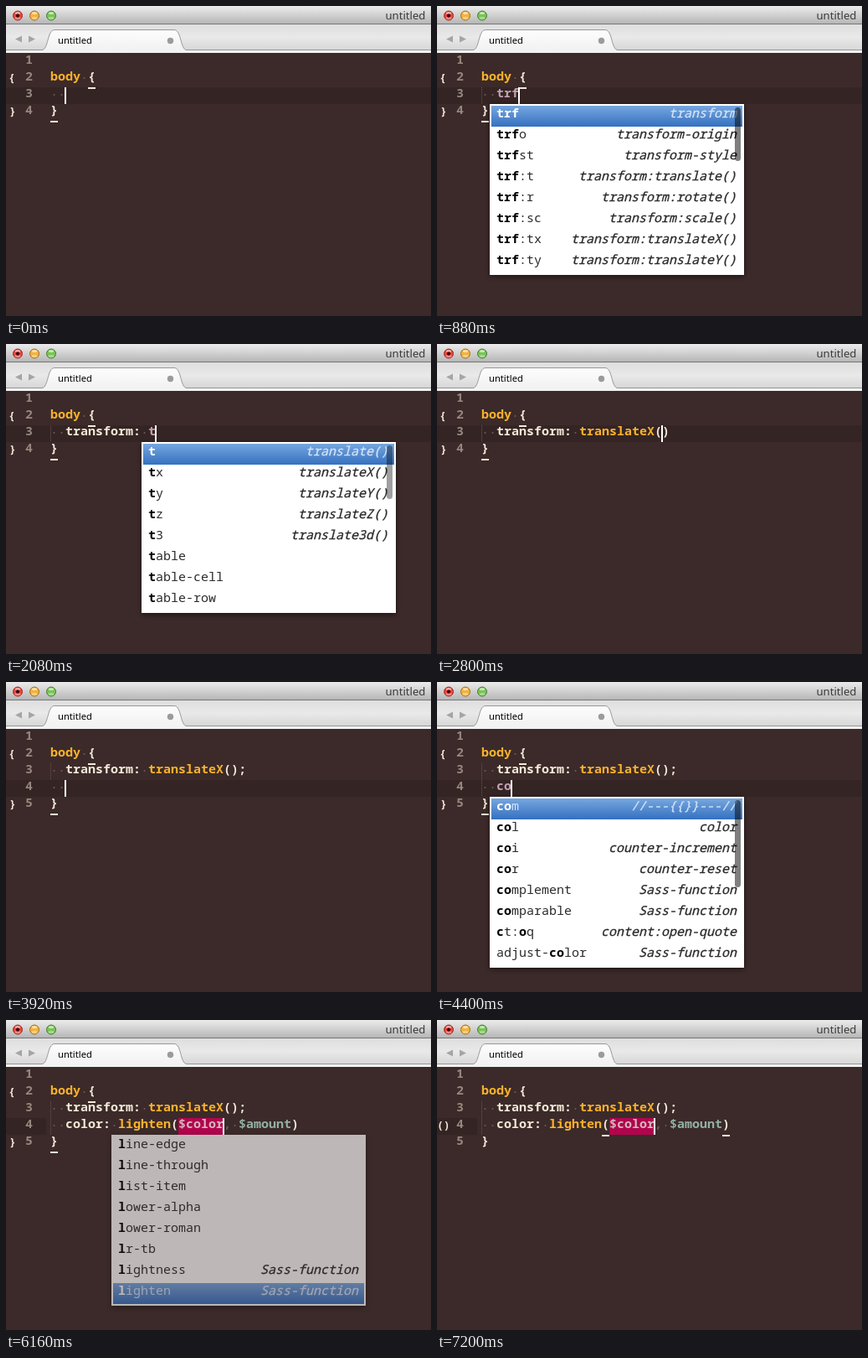
Animation of 508 by 370 pixels, one loop 8 s. Source, as an HTML page:

```html
<!DOCTYPE html>
<html lang="en">
<head>
<meta charset="utf-8">
<title>Editor autocompletion</title>
<style>
html, body { margin: 0; width: 100%; height: 100%; overflow: hidden; background: #3b2a29; }
svg { display: block; }
text { white-space: pre; font: 15px "Noto Sans Mono", monospace; }
.ui { font-family: "Noto Sans", sans-serif; }
.code { font-weight: bold; fill: #f2e8d8; }
.num { font-weight: bold; fill: #94877e; }
.mark { font-size: 13px; font-weight: bold; fill: #f2e8d8; }
.call { fill: #fbb22c; }
.bare { fill: #c3a2b2; }
.arg { fill: #92b0a6; }
.picked { fill: #d6b6bd; }
.dim { fill: #715d5b; }
.row { fill: #2b2b2b; }
.row .hit { font-weight: bold; fill: #000; }
.row .info { font-style: italic; stroke: #2b2b2b; stroke-width: .3px; }
.on, .row.on .info { fill: #d3e3f8; }
.row.on .info { stroke: #d3e3f8; }
.row.on .hit { fill: #fff; }
</style>
</head>
<body>
<svg width="508" height="370" viewBox="0 0 508 370">
  <defs>
    <linearGradient id="bar" x2="0" y2="1"><stop stop-color="#ececec"/><stop offset="1" stop-color="#b4b4b4"/></linearGradient>
    <linearGradient id="strip" x2="0" y2="1"><stop stop-color="#dedede"/><stop offset=".5" stop-color="#e9e9e9"/><stop offset="1" stop-color="#d6d6d6"/></linearGradient>
    <linearGradient id="tab" x2="0" y2="1"><stop stop-color="#fdfdfd"/><stop offset="1" stop-color="#f2f2f2"/></linearGradient>
    <linearGradient id="blue" x2="0" y2="1"><stop stop-color="#76a7df"/><stop offset="1" stop-color="#3570c0"/></linearGradient>
    <filter id="shade" x="-10%" y="-10%" width="120%" height="120%"><feDropShadow dx="0" dy="2" stdDeviation="3" flood-opacity=".5"/></filter>
  </defs>
  <rect width="508" height="370" fill="#3b2a29"/>
  <rect width="508" height="22" fill="url(#bar)"/>
  <rect y="22" width="508" height="31" fill="url(#strip)"/>
  <path d="M0 21.5H508" stroke="#777"/>
  <rect y="53" width="508" height="3" fill="#f2f2f2"/>
  <path d="M0 52.5H43C51 52 49 28.500 58 28.500H201C210 28.500 208 52 216 52.500H508" fill="url(#tab)" stroke="#979797"/>
  <path d="M45 52.500H214" stroke="#f2f2f2"/>
  <path d="M19 35.500V43.500L11 39.500ZM27 35.500V43.500L35 39.500Z" fill="#a5a5a5"/>
  <circle cx="196.500" cy="41.500" r="3.700" fill="#9b9b9b"/>
  <text class="ui" x="62" y="45" style="font-size:11.200px">untitled</text>
  <text class="ui" x="453.500" y="16" style="font-size:13.100px" fill="#3a3a3a">untitled</text>
  <g id="lights"></g>
  <circle cx="14" cy="11.500" r="2.200" fill="#4a0806"/>
  <g id="view"></g>
</svg>
<script>
const LOOP = 8000, STEP = 80, CHAR = 9, LEFT = 53;
const $ = id => document.getElementById(id);

// [start, third line, fourth line, caret distance from the line's end]
const edits = [
  [0, '  '],
  [400, '  t'],
  [640, '  tr'],
  [800, '  trf'],
  [1200, '  transform: '],
  [1920, '  transform: t'],
  [2240, '  transform: tx'],
  [2640, '  transform: translateX()', , 1],
  [3040, '  transform: translateX()'],
  [3440, '  transform: translateX();'],
  [3680, , '  '],
  [4080, , '  c'],
  [4320, , '  co'],
  [4480, , '  col'],
  [4960, , '  color: '],
  [5360, , '  color: l'],
  [6160, , '  color: lighten($color, $amount)', 10]
];
const DONE = '  transform: translateX();', PICK = 6160, PARENS = 6720;

// thumb: [offset, height]; fade: when the scroll thumb starts to vanish
const lists = [
  { from: 480, to: 720, key: 't', line: 3, col: 2, thumb: [2, 36], fade: 640,
    rows: 'ta text-align,td text-decoration,te text-emphasis,ti text-indent,to text-overflow,tt text-transform,tr transition,trf transform' },
  { from: 720, to: 880, key: 'tr', line: 3, col: 2, thumb: [2, 50], fade: 1000,
    rows: 'tr transition,trd transition-delay,trf transform,trfo transform-origin,trfst transform-style,trp transition-property,trf:t transform:translate(),trf:r transform:rotate()' },
  { from: 880, to: 1200, close: 1, key: 'trf', line: 3, col: 2, thumb: [4, 64], fade: 960,
    rows: 'trf transform,trfo transform-origin,trfst transform-style,trf:t transform:translate(),trf:r transform:rotate(),trf:sc transform:scale(),trf:tx transform:translateX(),trf:ty transform:translateY()' },
  { from: 2000, to: 2240, key: 't', line: 3, col: 13, thumb: [4, 64], fade: 2080,
    rows: 't translate(),tx translateX(),ty translateY(),tz translateZ(),t3 translate3d(),table,table-cell,table-row' },
  { from: 2240, to: 2640, close: 1, key: 'tx', line: 3, col: 13,
    rows: 'tx translateX(),text,text-top,text-bottom,context-menu,matrix,vertical-text,max Sass-function' },
  { from: 4160, to: 4400, key: 'c', line: 4, col: 2, thumb: [4, 40], fade: 4240,
    rows: 'c color,cl clear,cp clip,cur cursor,cnt content,com //---{{}}---//,col color,ceil Sass-function' },
  { from: 4400, to: 4480, key: 'co', line: 4, col: 2, thumb: [4, 104], fade: 4480,
    rows: 'com //---{{}}---//,col color,coi counter-increment,cor counter-reset,complement Sass-function,comparable Sass-function,ct:oq content:open-quote,adjust-color Sass-function' },
  { from: 4480, to: 4960, close: 1, key: 'col', line: 4, col: 2,
    rows: 'col color,adjust-color Sass-function,scale-color Sass-function,change-color Sass-function,ct:oq content:open-quote,ct:cq content:close-quote' },
  { from: 5360, to: 6160, close: 1, key: 'l', line: 4, col: 9, pick: 7, thumb: [16, 38], fade: 5520,
    rows: 'line-edge,line-through,list-item,lower-alpha,lower-roman,lr-tb,lightness Sass-function,lighten Sass-function' }
];

const span = (cls, s) => `<tspan class="${cls}">${s}</tspan>`;
const text = (cls, x, y, s, extra = '') => `<text class="${cls}" x="${x}" y="${y}" ${extra}>${s}</text>`;
const rect = (x, y, w, h, fill, extra = '') => `<rect x="${x}" y="${y}" width="${w}" height="${h}" fill="${fill}" ${extra}/>`;
const lineTop = n => 37 + 20 * n;
const colX = c => LEFT + CHAR * c;

function tint(s) {
  return s.replace(/\$\w+|\w+(?=\(| \{)|\w+$|,/g, m =>
    m === ',' ? span('dim', m) :
    m === '$color' ? span('picked', m) :
    m[0] === '$' ? span('arg', m) :
    s.endsWith(m) ? span('bare', m) : span('call', m));
}

// Visible white space: a dot for each blank, a blank for each letter.
const dots = s => s.replace(/./g, c => c === ' ' ? '·' : ' ');

// Bold the typed run, or its letters one by one when they are scattered.
function boldHits(label, key) {
  if (label.includes(key)) return label.replace(key, span('hit', key));
  let i = 0;
  return [...label].map(c => c === key[i] ? (i++, span('hit', c)) : c).join('');
}

function popup(p, t) {
  const rows = p.rows.split(','), x = colX(p.col) - 8, y = lineTop(p.line + 1);
  const alpha = t < p.to ? 1 : 1 - (t - p.to + STEP) / 240;
  let s = rect(x, y, 304, rows.length * 25 + 4, '#fff', 'filter="url(#shade)"');
  rows.forEach((row, i) => {
    const [label, info = ''] = row.split(' '), on = i === (p.pick || 0), top = y + 2 + 25 * i;
    if (on) s += rect(x + 2, top, 300, 25, 'url(#blue)');
    const cls = on ? 'row on' : 'row';
    s += text(cls, x + 8, top + 14, boldHits(label, p.key));
    s += text(cls, x + 295, top + 14, span('info', info), 'text-anchor="end"');
  });
  if (p.thumb) {
    const shown = Math.max(0, Math.min(1, 1 - (t - p.fade + STEP) / 320));
    s += rect(x + 293, y + p.thumb[0], 7, p.thumb[1], '#000', `rx="3.500" opacity="${.5 * shown}"`);
  }
  return `<g opacity="${alpha}">${s}</g>`;
}

function draw(t) {
  const [, third = DONE, fourth, back = 0] = edits.findLast(e => e[0] <= t);
  const two = fourth !== undefined, current = two ? 4 : 3, last = current + 1;
  const active = two ? fourth : third, picked = t >= PICK, parens = t >= PARENS;
  const lines = ['', 'body {', third, ...(two ? [fourth] : []), '}'];
  const top = lineTop(current);
  const under = (c, n) => rect(colX(c), lineTop(n + 1), CHAR, 2, '#f2e8d8');

  let s = rect(0, top, picked ? 48 : 508, 20, '#342423');
  if (picked) s += rect(colX(17), top, 54, 20, '#b1044d');
  lines.forEach((line, i) => {
    const y = lineTop(i + 1);
    s += text('num', 23, y + 12, i + 1) + text('dim', LEFT, y + 14, dots(line)) + text('code', LEFT, y + 12, tint(line));
    if (/^ +\w/.test(line))
      s += `<path d="M53.500 ${y}v20" stroke="#6a5553" stroke-dasharray="1 1"/>`;
  });
  s += parens
    ? under(16, 4) + under(32, 4) + text('mark', 0, 130, '()')
    : under(5, 2) + under(0, last) + text('mark', 3, 90, '{') + text('mark', 4, lineTop(last) + 13, '}');
  s += rect(colX(active.length - back) - 1, top, 2, 20, '#fff');

  s += lists.filter(p => t >= p.from && t < p.to + (p.close ? 2 * STEP : 0))
    .map(p => popup(p, t)).join('');
  $('view').innerHTML = s;
}

$('lights').innerHTML = [['#e9483f', '#9a2a24'], ['#f3b23c', '#a06f1c'], ['#79c455', '#3f7d2c']].map(([fill, edge], i) =>
  `<g transform="translate(${14 + 20 * i} 11.500)"><circle r="5.500" fill="${fill}" stroke="${edge}"/>
  <ellipse cy="-3" rx="3" ry="1.500" fill="#fff" opacity=".6"/><ellipse cy="3" rx="3.500" ry="1.800" fill="#fff" opacity=".35"/></g>`).join('');

let shown = -1;
function tick() {
  const t = Math.floor(performance.now() % LOOP / STEP) * STEP;
  if (t !== shown) draw(shown = t);
  requestAnimationFrame(tick);
}
tick();
</script>
</body>
</html>
```
